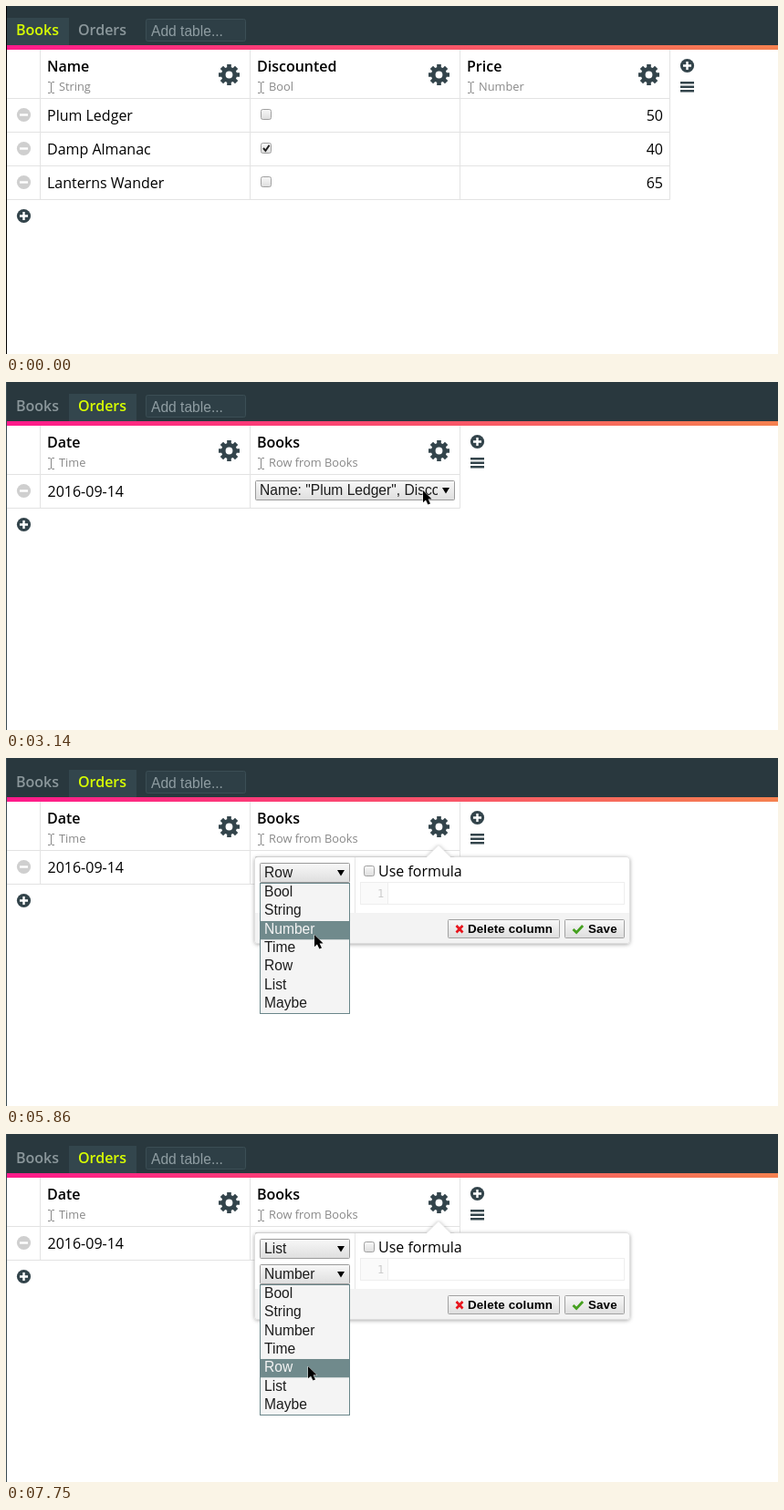
An HTML page that plays this animation: 846x382 px, repeating every 8000 ms.

```html
<!DOCTYPE html>
<html lang="en">
<head>
<meta charset="utf-8">
<title>Table editor</title>
<style>
html, body { margin: 0; width: 100%; height: 100%; overflow: hidden; background: #fff; }
svg { display: block; }
text { font: 16px "Open Sans", sans-serif; white-space: pre; }
.b { font-weight: 600; }
.s { font-size: 12.8px; fill: #888; }
.ui { font: 15.6px "Liberation Sans", Arial, sans-serif; fill: #1c1c1c; }
.btn { font: bold 13.33px "Liberation Sans", Arial, sans-serif; letter-spacing: .15px; }
.mono { font: 12px "DejaVu Sans Mono", monospace; fill: #ccc; }
</style>
</head>
<body>
<svg id="stage" width="846" height="382" viewBox="0 0 846 382" xmlns="http://www.w3.org/2000/svg">
  <defs>
    <linearGradient id="stripe"><stop stop-color="#ff1a8b"/><stop offset="1" stop-color="#f5814f"/></linearGradient>
    <linearGradient id="face" x2="0" y2="1"><stop stop-color="#f8f8f8"/><stop offset="1" stop-color="#dedede"/></linearGradient>
    <filter id="shade" x="-5%" y="-15%" width="110%" height="135%">
      <feDropShadow dx="0" dy="1" stdDeviation="2" flood-color="#000" flood-opacity=".35"/>
    </filter>
    <clipPath id="clip"><rect x="274" y="108" width="199" height="22"/></clipPath>
  </defs>
</svg>
<script>
const LOOP = 8000, DARK = '#33444b', LINE = '#e3e3e3', LIME = '#d8ff00', GREY = '#8b979b';
const ROW_H = 20.3;
const TYPES = ['Bool', 'String', 'Number', 'Time', 'Row', 'List', 'Maybe'];
const BOOKS = [['Plum Ledger', 'False', 50], ['Damp Almanac', 'True', 40], ['Lanterns Wander', 'True', 65]];
const LABELS = BOOKS.map(([n, d, p]) => `Name: "${n}", Discounted: ${d}, Price: ${p}`);

const stage = document.getElementById('stage');

const text = (x, y, s, attrs = '') => `<text x="${x}" y="${y}" ${attrs}>${s}</text>`;
const rect = (x, y, w, h, fill, attrs = '') =>
  `<rect x="${x}" y="${y}" width="${w}" height="${h}" fill="${fill}" ${attrs}/>`;
const box = (x, y, w, h, fill, stroke, r = 0) =>
  rect(x + .5, y + .5, w - 1, h - 1, fill, `stroke="${stroke}" rx="${r}"`);
const path = (d, attrs) => `<path d="${d}" ${attrs}/>`;
const group = (id, body) => `<g id="${id}">${body}</g>`;

function gear(cx, cy) {
  const pts = [];
  for (let i = 0; i < 8; i++) {
    const a = i * Math.PI / 4;
    for (const [r, da] of [[8.6, -.27], [11.7, -.2], [11.7, .2], [8.6, .27]])
      pts.push((cx + r * Math.sin(a + da)).toFixed(2) + ' ' + (cy - r * Math.cos(a + da)).toFixed(2));
  }
  const hole = `M${cx - 3.9} ${cy}a3.9 3.9 0 1 0 7.8 0a3.9 3.9 0 1 0 -7.8 0Z`;
  return path(`M${pts.join('L')}Z${hole}`, `fill="${DARK}" fill-rule="evenodd"`);
}

function disc(cx, cy, plus) {
  const bars = `M${cx - 4.5} ${cy}h9` + (plus ? `M${cx} ${cy - 4.5}v9` : '');
  return `<circle cx="${cx}" cy="${cy}" r="7.6" fill="${plus ? DARK : '#cfcfcf'}"/>` +
    path(bars, 'stroke="#fff" stroke-width="2.4"');
}

function column(x, name, type) {
  const beam = `M${x + 1} 83.5h2.2l1.3 1l1.3 -1h2.2M${x + 4.5} 84v11M${x + 1} 95.5h2.2l1.3 -1l1.3 1h2.2`;
  return text(x, 72, name, 'class="b"') + path(beam, 'fill="none" stroke="#888"') +
    text(x + 13, 93, type, 'class="s"') + gear(x + 199.5, 75.5);
}

function grid(cols, rows) {
  const right = 37.5 + 230 * cols, bottom = 101.5 + 37 * rows;
  let d = '', out = '';
  for (let i = 0; i <= cols; i++) d += `M${37.5 + 230 * i} 48V${bottom}`;
  for (let i = 0; i <= rows; i++) {
    d += `M1 ${101.5 + 37 * i}H${right}`;
    if (i < rows) out += disc(19.5, 119.5 + 37 * i, false);
  }
  const x = right + 11.5;
  const menu = `M${x} 84.2h15M${x} 88.7h15M${x} 93.2h15`;
  return path(d, `stroke="${LINE}"`) + out + disc(right + 19, 65.5, true) +
    path(menu, `stroke="${DARK}" stroke-width="2.5"`) + disc(19.5, bottom + 18, true);
}

const tick = (x, y) => path(`M${x + 3} ${y + 6}l2.4 2.8l4.2 -6`, 'fill="none" stroke="#222" stroke-width="2"');
const check = (x, y, on) => box(x, y, 12, 12, 'url(#face)', '#a0a0a0', 2) + (on ? tick(x, y) : '');

function select(x, y, w, label, id = '', clip = '') {
  const ax = x + w - 14;
  return box(x, y, w, 22, 'url(#face)', '#9a9a9a', 1) +
    `<g ${clip}>${text(x + 5, y + 16, label, `class="ui" ${id && `id="${id}"`}`)}</g>` +
    path(`M${ax} ${y + 8}h8l-4 6.5Z`, 'fill="#000"');
}

const list = (id, x, y, w, items) => group(id,
  box(x, y, w, Math.round(items.length * ROW_H) + 2, '#f4f4f4', '#6a868a') +
  rect(x + 1, y + 1, w - 2, ROW_H, '#708a8c', 'class="hl"') +
  items.map((s, i) => text(x + 5, Math.round(y + 15 + i * ROW_H), s, 'class="ui"')).join(''));

function booksTable() {
  return grid(3, 3) + column(45, 'Name', 'String') + column(275, 'Discounted', 'Bool') +
    column(505, 'Price', 'Number') +
    BOOKS.map(([name, , price], i) => {
      const y = 126 + 37 * i;
      return text(45, y, name) + check(279, y - 13, i === 1) + text(720, y, price, 'text-anchor="end"');
    }).join('') + group('ticked', tick(279, 187));
}

function ordersTable() {
  return grid(2, 1) + column(45, 'Date', 'Time') + column(275, 'Books', 'Row from Books') +
    text(45.5, 126, '2016-09-14') + select(273, 108, 219, LABELS[0], '', 'clip-path="url(#clip)"');
}

function popover() {
  const outline = 'M276 108.5H461L474 95.5L487 108.5H680Q683.5 108.5 683.5 112V200Q683.5 203.5 680 203.5' +
    'H276Q272.5 203.5 272.5 200V112Q272.5 108.5 276 108.5Z';
  return path(outline, 'fill="#fff" stroke="#d2d2d2" stroke-width=".6" filter="url(#shade)"') +
    path('M273 170H683V200Q683 203 680 203H276Q273 203 273 200Z', 'fill="#f3f3f3"') +
    path('M382.5 109V170', 'stroke="#e6e6e6"') +
    select(278, 115, 99, 'Row', 'kind') + group('inner', select(278, 143, 99, 'Number')) +
    check(392, 118, false) + text(408, 130, 'Use formula') +
    box(388, 136, 290, 25, '#fff', '#eee') + box(388, 136, 31, 25, '#fafafa', '#eee') +
    text(407, 153, '1', 'class="mono"') +
    text(281, 192, 'Cancel', `class="s" style="fill:${DARK}"`) +
    box(484, 177, 123, 21, 'url(#face)', '#a2a2a2', 1) +
    path('M493.5 184l7 7.5M500.5 184l-7 7.5', 'stroke="#e8141c" stroke-width="2.6"') +
    text(506, 192, 'Delete column', 'class="btn"') +
    box(612, 177, 66, 21, 'url(#face)', '#a2a2a2', 1) +
    path('M621.5 188l3.6 3.6l7 -7.6', 'fill="none" stroke="#45a01f" stroke-width="2.8"') +
    text(638, 192, 'Save', 'class="btn"');
}

const arrow = path('M0 0V13.2L3 10.4L5.4 15.6L8 14.5L5.6 9.5H9.6Z',
  'fill="#000" stroke="#fff" stroke-width=".9" paint-order="stroke"');
const hand = path('M.5 1.5Q1.5 0 3.5 1L8 4L12 5.5L16 10L17 13L13 16.5L9.5 15L4 11.5L4.5 10L8 11L5.5 8.5L3 8L3 6.5L6 6.5Z',
  'fill="#fff" stroke="#000" stroke-width="1.1"') +
  path('M6 6.5L9 8.5M8 4.5L11 7.5M10.5 5.5L13 8.5M10 12L14 14.5', 'stroke="#000" stroke-width=".9"');

stage.insertAdjacentHTML('beforeend',
  rect(0, 0, 846, 382, '#fff') + rect(0, 0, 846, 43, '#29383e') +
  rect(0, 13, 74, 30, '#33464d', 'id="tab"') + rect(0, 43, 846, 5, 'url(#stripe)') +
  text(11, 32, 'Books', 'class="b" id="tabBooks"') + text(79, 32, 'Orders', 'class="b" id="tabOrders"') +
  box(153, 14, 110, 25, '#2e3f46', '#3b4e55', 2) + text(159, 33, 'Add table...', 'class="ui" style="fill:#8f9da2"') +
  group('books', booksTable()) + group('orders', ordersTable()) + rect(0, 0, 1, 382, '#000', 'id="edge"') +
  list('rowList', 273, 130, 388, LABELS) + group('pop', popover()) +
  list('typeList', 278, 137, 99, TYPES) + list('innerList', 278, 165, 99, TYPES) +
  group('cursor', group('arrow', arrow) + group('hand', hand)));

const el = {};
for (const n of stage.querySelectorAll('[id]')) el[n.id] = n;

const smooth = k => k * k * (3 - 2 * k);
const settle = k => 1 - (1 - k) ** 2.5;

// start, end, x, y, easing
const MOVES = [
  [1420, 1500, 263, 191, smooth],
  [1770, 2050, 104, 25, smooth],
  [2650, 3140, 457, 118.5, smooth],
  [3560, 3710, 462, 191, smooth],
  [3710, 3860, 466, 121, smooth],
  [4320, 4460, 472, 64, smooth],
  [4910, 5190, 342, 124, smooth],
  [5740, 6150, 335, 244, settle],
  [6830, 7040, 334, 158, smooth],
  [7430, 7750, 331, 255, smooth]
];

function pointer(t) {
  let x = 279, y = 190;
  for (const [a, b, tx, ty, ease] of MOVES) {
    if (t <= a) break;
    const k = ease(Math.min(1, (t - a) / (b - a)));
    x += (tx - x) * k;
    y += (ty - y) * k;
  }
  return [x, y];
}

const show = (n, on) => n.setAttribute('display', on ? 'inline' : 'none');

function updateList(n, on, top, y, preset) {
  show(n, on);
  if (!on) return;
  const labels = n.querySelectorAll('text');
  const pick = y < top + 1 ? preset : Math.min(labels.length - 1, Math.floor((y - top - 1) / ROW_H));
  n.querySelector('.hl').setAttribute('y', Math.round(top + 1 + pick * ROW_H));
  labels.forEach((l, i) => { l.style.fill = i === pick ? '#f4f4f4' : '#1c1c1c'; });
}

function draw(t) {
  const [x, y] = pointer(t);
  const onTab = y < 43 && x > 69 && x < 143;
  const onGear = t > 4230 && Math.abs(x - 474) < 12 && Math.abs(y - 75) < 13;
  const moved = t >= 2420, switched = t >= 2460;

  el.edge.setAttribute('fill', t < 1420 ? '#000' : '#3a4b52');
  el.tab.setAttribute('x', moved ? 69 : 1);
  el.tab.setAttribute('width', moved ? 74 : 68);
  el.tabBooks.setAttribute('fill', t < 2480 ? LIME : GREY);
  el.tabOrders.setAttribute('fill', moved || (onTab && t > 1770) ? LIME : GREY);

  show(el.books, !switched);
  show(el.orders, switched);
  show(el.ticked, t >= 1420);
  show(el.pop, t >= 4830);
  show(el.inner, t >= 6830);
  el.kind.textContent = t < 6830 ? 'Row' : 'List';
  updateList(el.rowList, t >= 3400 && t < 4230, 130, y, 0);
  updateList(el.typeList, t >= 5440 && t < 6830, 137, y, 4);
  updateList(el.innerList, t >= 7340, 165, y, 2);

  show(el.cursor, t >= 1420);
  show(el.hand, onTab || onGear);
  show(el.arrow, !(onTab || onGear));
  el.cursor.setAttribute('transform', `translate(${Math.round(x)} ${Math.round(y)})`);
}

const begin = performance.now();
function frame() {
  draw((performance.now() - begin) % LOOP);
  requestAnimationFrame(frame);
}
frame();
</script>
</body>
</html>
```
